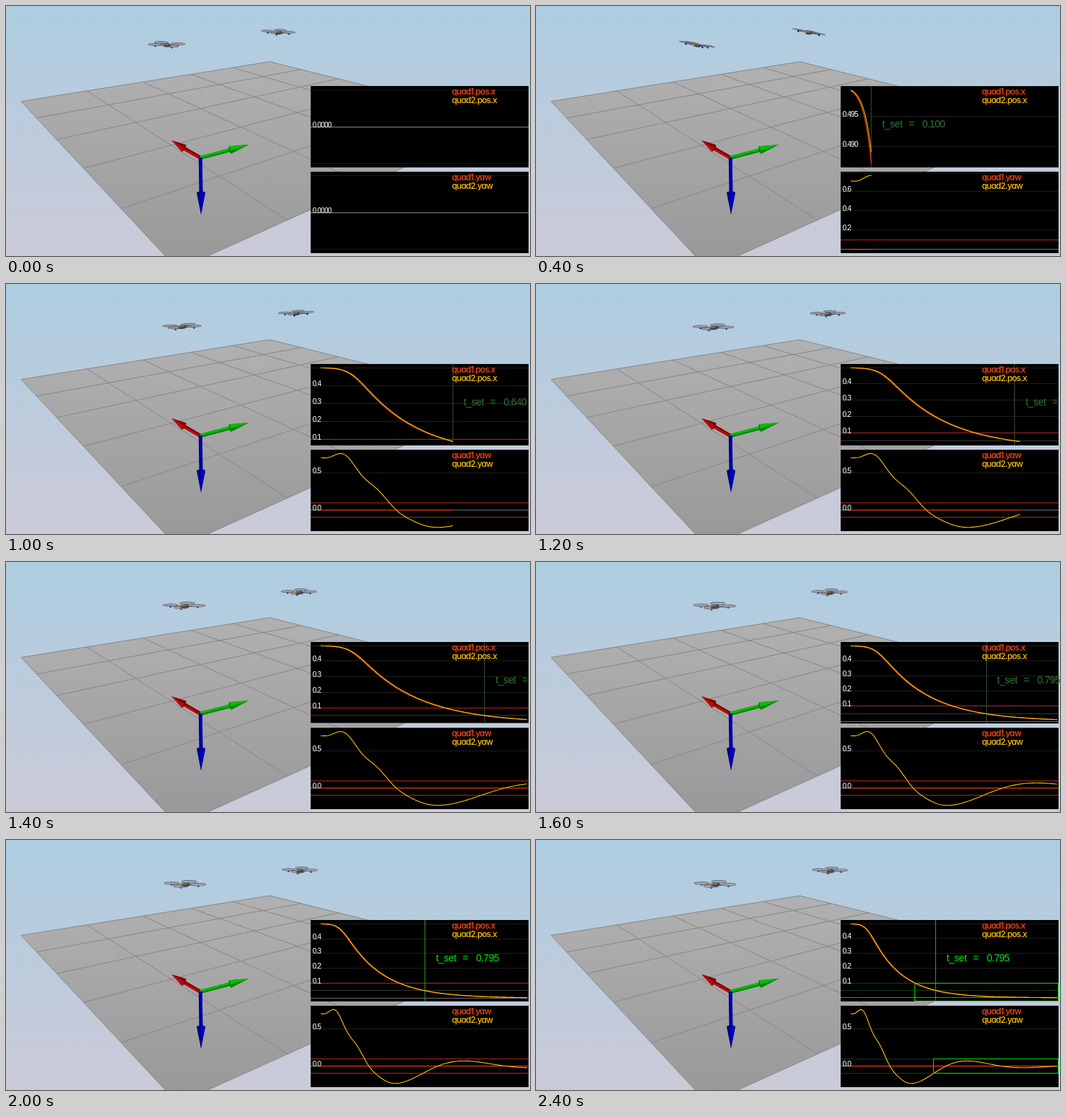
An HTML page with a canvas that plays this animation: 731x350 px, repeating every 2.5 s.

```html
<!DOCTYPE html>
<html lang="en">
<head>
<meta charset="utf-8">
<title>Two quadcopters, step response</title>
<style>
html, body { margin: 0; width: 100%; height: 100%; overflow: hidden; background: #bccbdb; }
canvas { position: absolute; left: 0; top: 0; }
.key {
  position: absolute; left: 622px; white-space: pre;
  font: 500 12px/12px Inter, "Liberation Sans", sans-serif;
  font-feature-settings: "cv11"; letter-spacing: -0.85px;
}
.one { color: #ff4612; }
.two { color: #ffc000; }
</style>
</head>
<body>
<canvas id="stage" width="731" height="350"></canvas>
<div class="key one" style="top:114px">quad1.pos.x</div>
<div class="key two" style="top:126px">quad2.pos.x</div>
<div class="key one" style="top:234px">quad1.yaw</div>
<div class="key two" style="top:246px">quad2.yaw</div>
<script>
const ctx = document.getElementById('stage').getContext('2d');
const { PI, abs, min, max, sin, cos, exp, log, floor } = Math;
const RED = '#ff4612', YELLOW = '#ffc000', GREEN = '#00e010';
const LEFT = 425, RIGHT = 729, START = 439, HEIGHT = 114;
const BAND = .1, FINE = .05;

// Exponential approach to zero after a soft delay
function posX(t) {
  const ramp = .034 * log(1 + exp((t - .155) / .034));
  return .5 * exp(-3.6 * ramp);
}

// Damped swing with a short ripple at the start
function yaw(t) {
  const d = t - .37;
  const swing = -.395 * exp(-2.3 * d) * sin(6.04 * d);
  const ripple = .055 * exp(-((t / .28) ** 2)) * cos(2 * PI * (t - .035) / .175);
  return swing - ripple;
}

// The craft lean with their acceleration
function lean(t) {
  const h = .01;
  const acc = (posX(t + h) - 2 * posX(t) + posX(t - h)) / (h * h);
  return -.2 * Math.tanh(acc / 4.5);
}

function settleTime(f, band) {
  let t = 2;
  while (t > 0 && abs(f(t)) <= band) t -= .001;
  return t + .001;
}

function makeChart(y, curves, isPos) {
  const enter = curves.map(f => settleTime(f, BAND)).filter(t => t > .01);
  return { y, curves, enter, isPos, top: y + 5.4, base: y + 108.7 };
}

const charts = [
  makeChart(112, [t => posX(t + .006), posX], true),
  makeChart(232, [() => 0, yaw], false)
];
const SETTLE = settleTime(posX, FINE);

function line(x0, y0, x1, y1, color, width = 1) {
  ctx.strokeStyle = color;
  ctx.lineWidth = width;
  ctx.beginPath();
  ctx.moveTo(x0, y0);
  ctx.lineTo(x1, y1);
  ctx.stroke();
}

function shape(pts, fill) {
  ctx.fillStyle = fill;
  ctx.beginPath();
  pts.forEach(p => ctx.lineTo(p[0], p[1]));
  ctx.closePath();
  ctx.fill();
}

function oval(x, y, rx, ry, turn, fill, edge) {
  ctx.beginPath();
  ctx.ellipse(x, y, rx, ry, turn, 0, 2 * PI);
  ctx.fillStyle = fill;
  ctx.fill();
  if (edge) {
    ctx.strokeStyle = edge;
    ctx.lineWidth = 1;
    ctx.stroke();
  }
}

function fade(y0, y1, a, b) {
  const g = ctx.createLinearGradient(0, y0, 0, y1);
  g.addColorStop(0, a);
  g.addColorStop(1, b);
  return g;
}

function text(str, x, y, size, color, gap) {
  ctx.font = size + 'px "Liberation Sans", Arial, sans-serif';
  ctx.letterSpacing = gap + 'px';
  ctx.fillStyle = color;
  ctx.fillText(str, x, y);
}

// Perspective of the ground plane, in grid cells
function ground(u, v) {
  const w = 1 + .0875 * u - .112 * v;
  return [(21 + 101.6 * u + 16.9 * v) / w, (133.5 - 4.28 * u + 5.77 * v) / w];
}

function drawGround() {
  shape([ground(0, 0), ground(5, 0), ground(5, 5), ground(0, 5)],
    fade(78, 350, '#b1b1b1', '#999999'));
  for (let i = 0; i <= 5; i++) {
    line(...ground(i, 0), ...ground(i, 5), '#868686');
    line(...ground(0, i), ...ground(5, i), '#868686');
  }
}

function arrow(neck, tip, half, light, dark) {
  const x = 271.3, y = 212.5, [bx, by] = neck;
  const dx = tip[0] - x, dy = tip[1] - y, len = Math.hypot(dx, dy);
  const nx = -dy / len, ny = dx / len;
  line(x, y, bx, by, dark, 5);
  line(x - nx, y - ny, bx - nx, by - ny, light, 2.6);
  oval(bx, by, half, 2, Math.atan2(ny, nx), dark);
  shape([[bx + nx * half, by + ny * half], tip, [bx - nx * half, by - ny * half]], dark);
  shape([[bx + nx, by + ny], tip, [bx - nx * half, by - ny * half]], light);
}

function drawAxes() {
  arrow([248, 199], [231, 188], 5.5, '#c00808', '#800000');
  arrow([313, 201.5], [339, 194], 5.5, '#08bc08', '#008600');
  arrow([272, 261.5], [272, 292], 6, '#0000c0', '#000088');
}

function drawDrone(x, y, arm, rotor, heading, roll) {
  ctx.save();
  ctx.translate(x, y);
  ctx.rotate(roll);
  const flat = max(.05, .17 - abs(roll));
  const ends = [0, 1, 2, 3].map(k => {
    const a = heading + k * PI / 2;
    return [arm * cos(a), -arm * flat * sin(a)];
  }).sort((a, b) => a[1] - b[1]);
  ends.forEach(([ex, ey]) => {
    line(0, .8, ex, ey + .5, '#4c4d54', 1.5);
    ctx.fillStyle = '#2020a8';
    ctx.fillRect(ex - 1.2, ey, 2.4, 2.8);
    oval(ex, ey - .6, rotor, rotor * flat, 0, '#a4a7b0', '#686a72');
  });
  oval(0, .8, arm * .36, 2.7, 0, '#44464c');
  oval(-1, -.4, arm * .22, 1, 0, '#77787e');
  ctx.fillStyle = '#b89428';
  ctx.fillRect(-arm * .42, .1, arm * .22, 1.5);
  ctx.restore();
}

const crisp = v => floor(v) + .5;
const row = (y, color) => line(LEFT, crisp(y), RIGHT, crisp(y), color);
const label = (str, y) => text(str, 427.5, y + .5, 10.5, '#fff', -1);

function tickStep(range) {
  const unit = 10 ** floor(Math.log10(range)), r = range / unit;
  return unit * (r < 3 ? .5 : r < 6 ? 1 : r < 9 ? 2 : 5);
}

function drawEmpty(c) {
  const mid = c.y + 57.2;
  row(c.top, '#1e1414');
  row(c.base, '#1e1414');
  row(mid, '#858585');
  label('0.0000', mid);
}

function drawPlot(c, T) {
  const times = Array.from({ length: 241 }, (_, k) => T * k / 240);
  const values = c.curves.flatMap(f => times.map(f));
  const low = min(...values), high = max(...values);
  const scaleX = 288 / max(1, T), scaleY = (c.base - c.top) / (high - low);
  const px = t => START + t * scaleX;
  const py = v => c.top + (high - v) * scaleY;
  const inside = c.enter.every(t => T >= t + 1);
  const settled = T >= SETTLE + .5, mark = min(T, SETTLE);

  const step = tickStep(high - low);
  const digits = max(1, Math.ceil(-Math.log10(step) - 1e-6));
  const ticks = [];
  for (let k = floor(low / step); k <= high / step + 1; k++) ticks.push(k * step);
  ticks.forEach(v => row(py(v), '#1e1e1e'));
  if (c.isPos) row(py(FINE), inside ? '#143c16' : '#343834');
  row(py(0), '#707070');
  [BAND, -BAND].forEach(v => row(py(v), inside ? '#143c16' : '#b42424'));
  if (c.isPos) {
    const x = crisp(px(mark));
    line(x, c.y, x, c.y + HEIGHT, settled ? '#20a028' : '#2c5030');
  }

  c.curves.forEach((f, i) => {
    ctx.strokeStyle = i ? YELLOW : RED;
    ctx.lineWidth = 1.1;
    ctx.beginPath();
    times.forEach(t => ctx.lineTo(px(t), py(f(t))));
    ctx.stroke();
  });

  if (inside) c.enter.forEach(t => {
    const x = crisp(px(t)), y = crisp(py(BAND));
    const bottom = min(crisp(py(-BAND)), c.y + HEIGHT - .5);
    ctx.strokeStyle = GREEN;
    ctx.lineWidth = 1;
    ctx.strokeRect(x, y, RIGHT - .5 - x, bottom - y);
  });
  ticks.forEach(v => {
    const y = py(v);
    if (y > c.top + 5 && y < c.base - 1) label(abs(v).toFixed(digits), y);
  });
  if (c.isPos) return { x: px(mark) + 15, mark, color: settled ? GREEN : '#2f7436' };
}

function drawChart(c, T, started) {
  ctx.save();
  ctx.beginPath();
  ctx.rect(LEFT, c.y, RIGHT - LEFT, HEIGHT);
  ctx.clip();
  ctx.fillStyle = '#000';
  ctx.fillRect(LEFT, c.y, RIGHT - LEFT, HEIGHT);
  const note = started ? drawPlot(c, T) : drawEmpty(c);
  ctx.restore();
  if (!note) return;
  text('t_set', note.x, 170, 14, note.color, -.4);
  text('=', note.x + 37, 170, 14, note.color, 0);
  text(note.mark.toFixed(3), note.x + 56, 170, 14, note.color, -.7);
}

function draw(ms) {
  const n = max(0, floor((ms - 400) / 100) + 1);
  const T = .01 + .09 * n + (n > 11 ? .03 : 0);
  ctx.fillStyle = fade(0, 350, '#adcde1', '#cbcad8');
  ctx.fillRect(0, 0, 731, 350);
  drawGround();
  drawAxes();
  const p = 1 - posX(T) / .5, roll = lean(T);
  drawDrone(224 + 25.8 * p, 54 + 8 * p * p, 17.5 + 2 * p, 9.7 + .6 * p, yaw(T) - .28, roll);
  drawDrone(380 + 30 * p, 36.5 + 6 * p * p, 15 + p, 8.5 + .5 * p, -.17, roll);
  charts.forEach(c => drawChart(c, T, n > 0));
}

function loop() {
  draw(performance.now() % 2500);
  requestAnimationFrame(loop);
}
loop();
</script>
</body>
</html>
```
